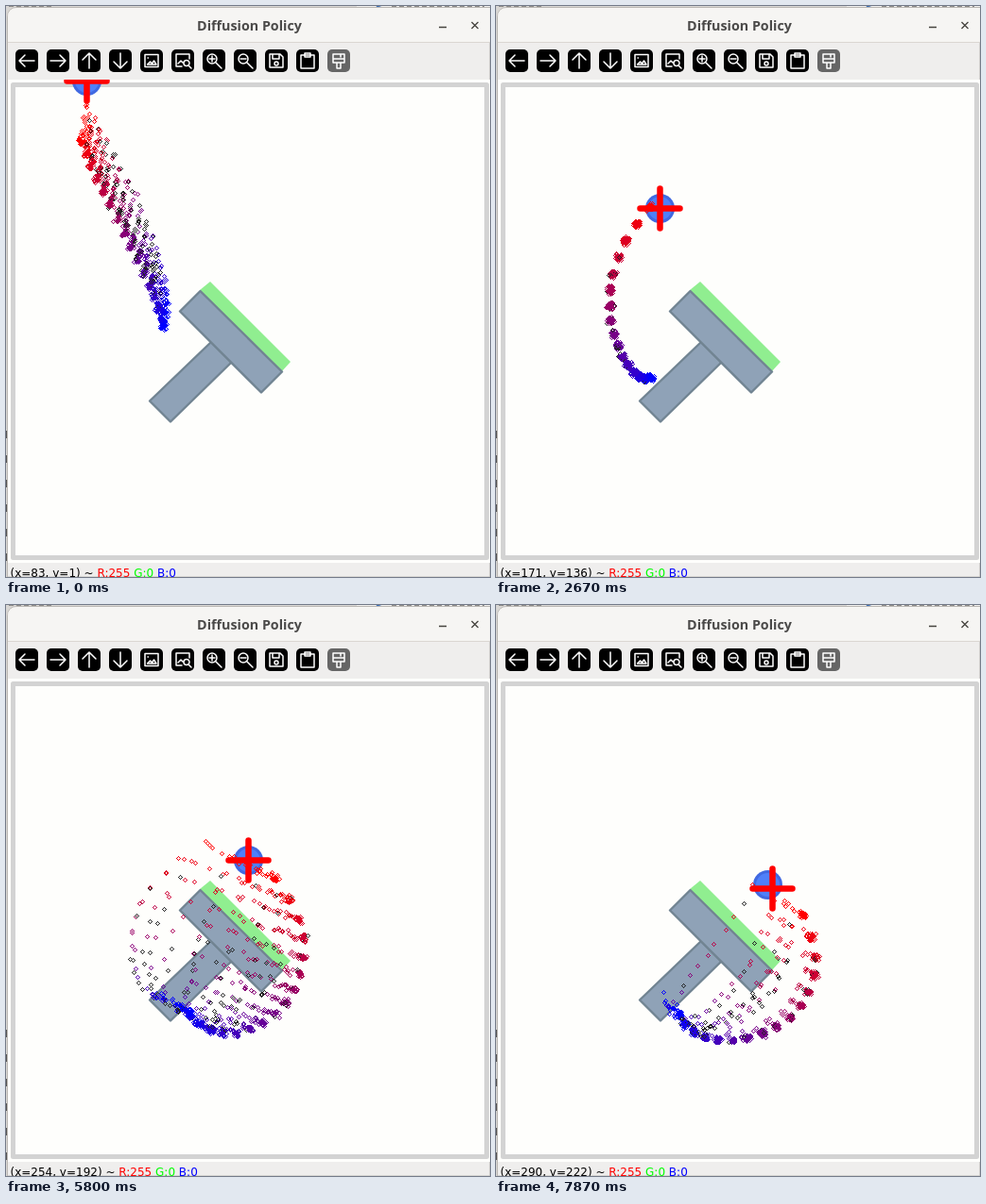
An HTML page with a canvas for the animation above (8000 ms loop, 512 by 605 pixels).

```html
<!DOCTYPE html>
<html lang="en">
<head>
<meta charset="utf-8">
<title>Diffusion Policy</title>
<style>
  html, body { margin: 0; width: 100%; height: 100%; overflow: hidden; background: #efeeed; }
  svg, canvas { position: absolute; left: 0; top: 0; display: block; }
  canvas { top: 78px; }
  .title { font: 700 14.3px "Open Sans", sans-serif; fill: #4b4a49; text-anchor: middle; }
  .status { font: 12px "DejaVu Sans", sans-serif; white-space: pre; }
  .icon { fill: none; stroke: #fff; stroke-width: 1.5; stroke-linecap: round; stroke-linejoin: round; }
  .block { fill: #8fa2b7; stroke: #718492; stroke-width: 2.4; stroke-linejoin: round; }
</style>
</head>
<body>
<svg width="512" height="605" viewBox="0 0 512 605">
  <!-- windows behind -->
  <rect width="512" height="605" fill="#d9d7d4"/>
  <rect x="371" width="141" height="4" fill="#f0efed"/>
  <path d="M3 .5H48M408 .5h98" stroke="#8d8b88" stroke-dasharray="5 3"/>
  <path d="M392 0l5 2" stroke="#3d6fb5" stroke-width="2"/>
  <path d="M.5 450V590" stroke="#555" stroke-dasharray="8 18"/>

  <!-- window -->
  <path d="M1.5 605V12Q1.5 1.5 12 1.5H512V605Z" fill="#efeeed" stroke="#bbb8b4"/>
  <path d="M2 38V12Q2 2 12 2H512V38Z" fill="#f6f5f3"/>
  <path d="M2 38.5H512" stroke="#dad6d2"/>
  <text class="title" x="257.5" y="25.5">Diffusion Policy</text>
  <path d="M458 22.5h8M492.5 17l7 7m0-7l-7 7" stroke="#45433f" stroke-width="1.3" fill="none"/>
  <g id="tools"></g>

  <!-- scene -->
  <rect x="2" y="78" width="510" height="512" fill="#fefefc"/>
  <rect x="7.5" y="83.5" width="501" height="501" fill="none" stroke="#d3d3d3" stroke-width="5" stroke-linejoin="round"/>
  <path d="M216 292L301 377 291 388 205 301Z" fill="#90ee90"/>
  <path class="block" d="M217 356L238.5 377.5 174 440.5 152 418.5Z"/>
  <path class="block" d="M205.5 302L292 387.5 270 409.5 184 323.5Z"/>

  <text class="status" x="4.5" y="605"><tspan id="place"></tspan><tspan fill="#f00">R:255</tspan> <tspan fill="#0f0">G:0</tspan> <tspan fill="#00f">B:0</tspan></text>
</svg>
<canvas id="scene" width="512" height="512"></canvas>

<script>
const LOOP = 8000, HORIZON = 16, SAMPLES = 50, JITTER = 1.8, TOP = 78;

// Toolbar
const lens = 'M3-2a5 5 0 1 1-10 0a5 5 0 1 1 10 0M2 2l6 6';
const icons = [
  'M8 0H-8M-2-6l-6 6 6 6', 'M-8 0H8M2-6l6 6-6 6',
  'M0 8V-8M-7-1l7-7 7 7', 'M0-8V8M-7 1l7 7 7-7',
  'M-7-6.5h14v13h-14zM-4.5 4l3-3 2 2 2-3 2.500 4zM-4-3h.5',
  'M7-2v-5h-14v13h6M-5 3l3-3 2 2M7 2.500a3 3 0 1 1-6 0a3 3 0 1 1 6 0M6 5l3 3',
  lens + 'M-5-2h6M-2-5v6', lens + 'M-5-2h6',
  'M-7-7h11l3 3v11h-14zM-4-6v4h7v-4M2 3a2 2 0 1 1-4 0a2 2 0 1 1 4 0',
  'M-7-6h14v14h-14zM-3-8h6v4h-6z',
  'M-6-7h12v9h-12zM-6-2h12M-2 2v6h4v-6M2-7v3'
];
document.getElementById('tools').innerHTML = icons.map((d, i) => `
  <g transform="translate(${22 + 33 * i} 58)">
    <rect x="-12" y="-12" width="24" height="24" rx="5" fill="${i < 10 ? '#000' : '#666'}"/>
    <path class="icon" d="${d}"/>
  </g>`).join('');

// Helpers
const clamp = (v, low, high) => Math.min(Math.max(v, low), high);
const mix = (a, b, k) => a + (b - a) * k;
const mixAll = (a, b, k) => a.map((v, i) => mix(v, b[i], k));

// Values at time t of a track of [time, values] keys
function track(keys, t) {
  const i = keys.findIndex(key => key[0] > t);
  if (i < 0) return keys[keys.length - 1][1];
  if (i === 0) return keys[0][1];
  const [t0, a] = keys[i - 1], [t1, b] = keys[i];
  return mixAll(a, b, (t - t0) / (t1 - t0));
}

function random(seed) {
  let s = seed * 7919 + 17;
  return () => {
    s = (s + 0x6D2B79F5) | 0;
    let r = Math.imul(s ^ s >>> 15, 1 | s);
    r = r + Math.imul(r ^ r >>> 7, 61 | r) ^ r;
    return ((r ^ r >>> 14) >>> 0) / 4294967296;
  };
}

function bezier([ax, ay, bx, by, cx, cy, dx, dy], k) {
  const m = 1 - k, p = m * m * m, q = 3 * m * m * k, r = 3 * m * k * k, s = k * k * k;
  return [p * ax + q * bx + r * cx + s * dx, p * ay + q * by + r * cy + s * dy];
}

// The two ways round the block, as Bezier curves
const sharpLeft = [196, 247, 31, 310, 139, 429, 158, 407];
const wideRight = [285, 290, 375, 400, 240, 500, 195, 432];
const left = [
  [70, [80, 145, 100, 200, 160, 300, 166, 340]],
  [1600, [142, 190, 115, 306, 165, 357, 186, 364]],
  [2130, [163, 213, 80, 300, 139, 404, 163, 394]],
  [2670, [163, 213, 80, 300, 139, 404, 163, 394]],
  [3600, sharpLeft], [5800, sharpLeft],
  [6530, [220, 267, 28, 291, 141, 412, 153, 393]]
];
const right = [
  [70, [86, 105, 115, 160, 170, 250, 172, 315]],
  [1600, [170, 185, 184, 298, 265, 342, 226, 374]],
  [3600, wideRight], [6530, wideRight],
  [7530, [325, 328, 384, 452, 215, 495, 194, 433]]
];

// How firmly the plans agree: above 0 on the left way, below 0 on the right way
const accord = [[70, [1.6]], [1600, [2]], [2130, [9]], [2670, [9]], [4470, [4]],
  [5800, [-1.5]], [6530, [2.6]], [7530, [-4]]];

// Cursor moves: start, end, goal
const home = [85, 79];
const moves = [[250, 2250, 173, 214], [2870, 3600, 240, 247], [5000, 5600, 256, 270], [7200, 7870, 292, 300]];

function cursor(t) {
  return moves.reduce((from, [start, end, ...goal]) => {
    const k = clamp((t - start) / (end - start), 0, 1);
    return mixAll(from, goal, 1 - (1 - k) ** 2);
  }, home).map(Math.round);
}

// Redraws fall on a 15 fps clock, about every 2.56 ticks, with one long rest
const run = (first, count) => Array.from({ length: count }, (_, i) => Math.floor(first + 2.56 * i));
const steps = [0, ...run(1.34, 13), 40, ...run(41.86, 31)].map(tick => Math.round(tick * 20 / 3) * 10);

const ctx = document.getElementById('scene').getContext('2d');
const place = document.getElementById('place');

function disc([x, y], radius, color) {
  ctx.fillStyle = color;
  ctx.beginPath();
  ctx.arc(x + .5, y + .5, radius, 0, 2 * Math.PI);
  ctx.fill();
}

function ring(x, y, color) {
  x = Math.round(x);
  y = Math.round(y);
  ctx.fillStyle = color;
  for (let i = -2; i <= 2; i++) {
    const h = 2 - Math.abs(i);
    ctx.fillRect(x + i, y - h, 1, 1);
    ctx.fillRect(x + i, y + h, 1, 1);
  }
}

function drawPlans(t, seed) {
  const rnd = random(seed), normal = () => (rnd() + rnd() + rnd() - 1.5) * 2;
  const [firm] = track(accord, t), a = track(left, t), b = track(right, t);
  for (let s = 0; s < SAMPLES; s++) {
    const stray = rnd() ** 2 ** Math.abs(firm);
    const plan = mixAll(a, b, firm < 0 ? 1 - stray : stray);
    for (let j = 0; j < HORIZON; j++) {
      const k = j / (HORIZON - 1), [x, y] = bezier(plan, k);
      const dark = rnd() < (stray > .1 ? .4 : .08) * Math.sin(Math.PI * k);
      ring(x + JITTER * normal(), y + JITTER * normal(),
        dark ? '#222' : `rgb(${Math.round(255 * (1 - k))},0,${Math.round(255 * k)})`);
    }
  }
}

function drawCross([x, y]) {
  ctx.strokeStyle = '#f00';
  ctx.lineWidth = 6.5;
  ctx.lineCap = 'round';
  ctx.beginPath();
  ctx.moveTo(x - 20.5, y + .5);
  ctx.lineTo(x + 21.5, y + .5);
  ctx.moveTo(x + .5, y - 20.5);
  ctx.lineTo(x + .5, y + 21.5);
  ctx.stroke();
}

function draw(index) {
  const t = steps[index], agent = cursor(t - 250), [x, y] = cursor(t + 100);
  ctx.setTransform(1, 0, 0, 1, 0, -TOP);
  ctx.clearRect(0, TOP, 512, 512);
  disc(agent, 15.5, '#4169e1');
  disc(agent, 12.5, '#4f80fa');
  drawPlans(t, index + 1);
  drawCross(cursor(t));
  place.textContent = `(x=${x - 2}, y=${y - TOP}) ~ `;
}

let shown = -1;
const start = performance.now();
function tick() {
  const t = (performance.now() - start) % LOOP;
  const next = steps.findIndex(s => s > t);
  const index = (next < 0 ? steps.length : next) - 1;
  if (index !== shown) draw(shown = index);
  requestAnimationFrame(tick);
}
tick();
</script>
</body>
</html>
```
